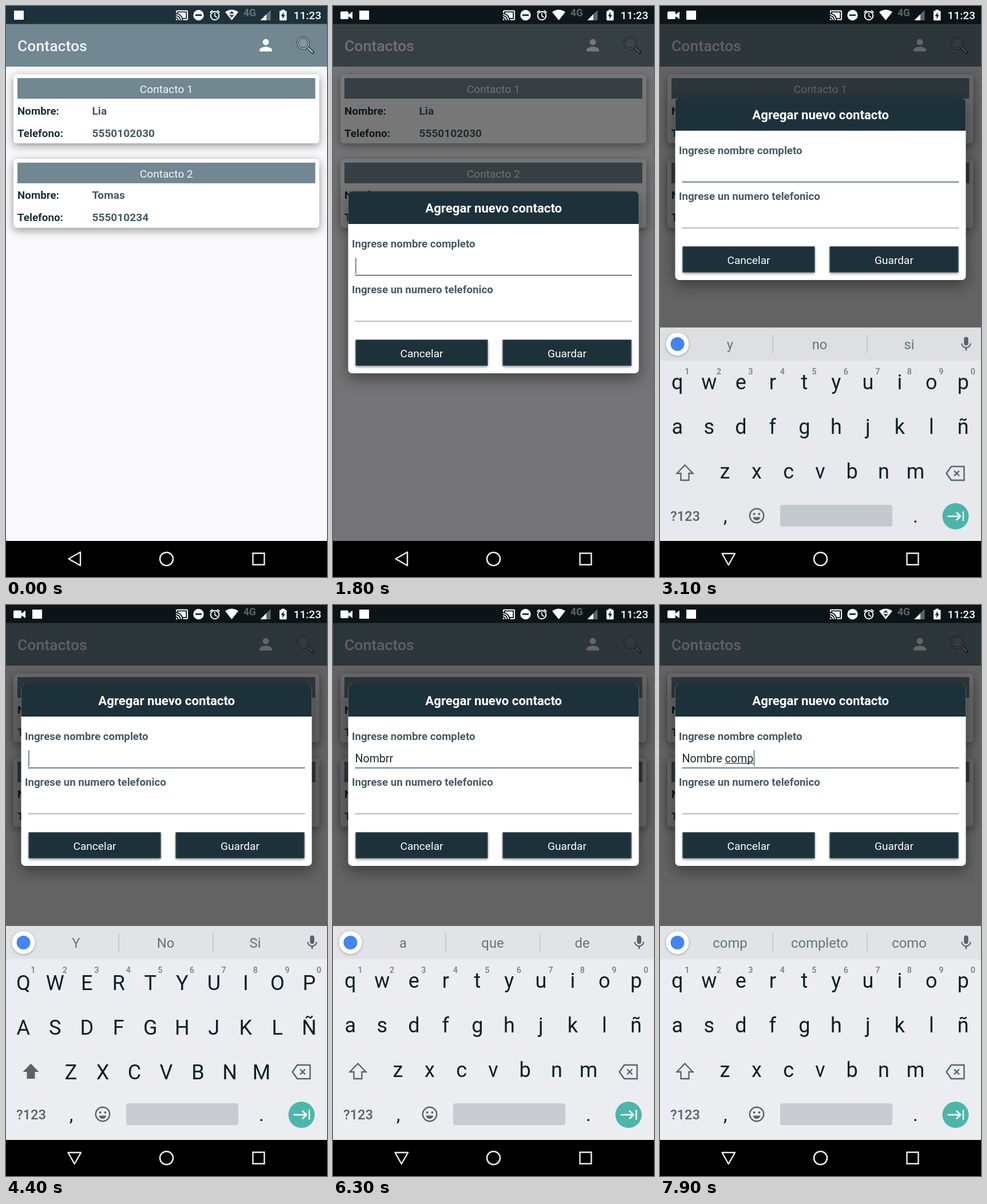
An HTML page with a canvas for the animation above (8000 ms loop, 561 px wide and 998 px high).

```html
<!DOCTYPE html>
<html lang="es">
<head>
<meta charset="utf-8">
<title>Contactos</title>
<style>
html, body { margin: 0; width: 100%; height: 100%; overflow: hidden; background: #000; }
canvas { display: block; }
</style>
</head>
<body>
<canvas id="stage" width="561" height="998"></canvas>
<script>
const W = 561, H = 998, LOOP = 8000, TAU = Math.PI * 2;
const DARK = '#1c313a', MID = '#455a64', LIGHT = '#718792', KEY = '#0b1f28', ICON = '#55636b';
const main = document.getElementById('stage').getContext('2d');
const scratch = document.createElement('canvas');
scratch.width = W;
scratch.height = H;
const buffer = scratch.getContext('2d');
let g = main;

const personIcon = new Path2D('M12 12c2.21 0 4-1.79 4-4s-1.79-4-4-4-4 1.79-4 4 1.79 4 4 4zm0 2c-2.67 0-8 1.34-8 4v2h16v-2c0-2.66-5.33-4-8-4z');
const micIcon = new Path2D('M12 14c1.66 0 3-1.34 3-3V5c0-1.66-1.34-3-3-3S9 3.34 9 5v6c0 1.66 1.34 3 3 3zm5.3-3c0 3-2.54 5.1-5.3 5.1S6.7 14 6.7 11H5c0 3.41 2.72 6.23 6 6.72V21h2v-3.28c3.28-.48 6-3.3 6-6.72h-1.7z');
const castIcon = new Path2D('M21 3H3c-1.1 0-2 .9-2 2v3h2V5h18v14h-7v2h7c1.1 0 2-.9 2-2V5c0-1.1-.9-2-2-2zM1 18v3h3c0-1.66-1.34-3-3-3zm0-4v2c2.76 0 5 2.24 5 5h2c0-3.87-3.13-7-7-7zm0-4v2c4.97 0 9 4.03 9 9h2c0-6.08-4.93-11-11-11zM19 7H5v1.63c3.96 1.28 7.09 4.41 8.37 8.37H19V7z');

// Press time and key; '<' is backspace. A key takes effect on release.
const HOLD = 100;
const strokes = [
  [4700, 'N'], [4900, 'o'], [5000, 'm'], [5200, 'b'], [5300, 'r'], [5500, 'r'], [5700, ' '],
  [6500, '<'], [6700, '<'], [6900, 'e'], [7200, ' '],
  [7400, 'c'], [7500, 'o'], [7700, 'm'], [7800, 'p']
];
const rows = [['qwertyuiop', 0, 672.5], ['asdfghjklñ', 0, 750.5], ['zxcvbnm', 1.5, 828.5]];

const clamp = v => Math.max(0, Math.min(1, v));
const easeOut = (u, n) => 1 - Math.pow(1 - clamp(u), n);
const smooth = u => (u = clamp(u), u * u * (3 - 2 * u));
const within = (t, a, b) => t >= a && t < b;
const keyX = i => 30.3 + 55.5 * i;

function text(s, x, y, size, color, weight = 400, align = 'left') {
  g.font = `${weight} ${size}px Roboto, sans-serif`;
  g.textAlign = align;
  g.fillStyle = color;
  g.fillText(s, x, y);
}

function rect(x, y, w, h, color) {
  g.fillStyle = color;
  g.fillRect(x, y, w, h);
}

function box(x, y, w, h, r, color) {
  g.beginPath();
  g.roundRect(x, y, w, h, r);
  g.fillStyle = color;
  g.fill();
}

function disc(x, y, r, color) {
  g.beginPath();
  g.arc(x, y, r, 0, TAU);
  g.fillStyle = color;
  g.fill();
}

function ring(x, y, r, color, width) {
  g.beginPath();
  g.arc(x, y, r, 0, TAU);
  g.strokeStyle = color;
  g.lineWidth = width;
  g.stroke();
}

function trace(pts, closed) {
  g.beginPath();
  for (let i = 0; i < pts.length; i += 2) g.lineTo(pts[i], pts[i + 1]);
  if (closed) g.closePath();
}

function poly(pts, color) {
  trace(pts, true);
  g.fillStyle = color;
  g.fill();
}

function line(pts, color, width, closed) {
  trace(pts, closed);
  g.strokeStyle = color;
  g.lineWidth = width;
  g.stroke();
}

function icon(path, x, y, scale, color) {
  g.save();
  g.translate(x, y);
  g.scale(scale, scale);
  g.fillStyle = color;
  g.fill(path);
  g.restore();
}

function shadowed(blur, dy, alpha, draw) {
  g.save();
  g.shadowColor = `rgba(0,0,0,${alpha})`;
  g.shadowBlur = blur;
  g.shadowOffsetY = dy;
  draw();
  g.restore();
}

// Draws a group as one translucent layer.
function layer(alpha, dy, draw) {
  buffer.clearRect(0, 0, W, H);
  g = buffer;
  draw();
  g = main;
  g.globalAlpha = alpha;
  g.drawImage(scratch, 0, dy);
  g.globalAlpha = 1;
}

function card(y, title, name, phone) {
  shadowed(15, 4, .42, () => box(13, y, 534.5, 120.5, 6, '#fff'));
  rect(20, y + 6.5, 520.5, 36, LIGHT);
  text(title, 280.3, y + 32.5, 19.1, '#f6f7f8', 400, 'center');
  text('Nombre:', 20, y + 70, 18.8, DARK, 700);
  text(name, 150.5, y + 70, 19.1, MID, 700);
  text('Telefono:', 20, y + 109, 18.8, DARK, 700);
  text(phone, 150.5, y + 109, 19.1, MID, 700);
}

function page() {
  rect(0, 0, W, 935, '#f9f8fb');
  rect(0, 0, W, 32, DARK);
  rect(0, 31.5, W, 74.5, LIGHT);
  text('Contactos', 20, 79, 26.6, '#f2f4f5', 500);
  icon(personIcon, 437.7, 52.2, 1.364, '#fff');
  g.lineCap = 'round';
  line([528, 73.5, 536, 81], '#333b40', 5.5);
  line([528.5, 74, 535.5, 80.6], '#b9c0c4', 2.6);
  disc(519.5, 65, 10, '#84969f');
  ring(519.5, 65, 9.6, '#333b40', 3.6);
  ring(519.5, 65, 9.6, '#c9cfd2', 1.4);
  card(119.5, 'Contacto 1', 'Lia', '5550102030');
  card(267.3, 'Contacto 2', 'Tomas', '555010234');
}

function statusIcons(t) {
  let x = 14;
  if (t >= 100) {
    box(13, 9.5, 14, 13.5, 2, '#fff');
    poly([27, 15, 34, 9.5, 34, 23, 27, 18], '#fff');
    x = 46;
  }
  rect(x, 8, 17, 16, '#fff');
  icon(castIcon, 296, 4.6, .96, '#fff');
  disc(336.5, 16, 9.2, '#fff');
  rect(331, 14.6, 11, 2.8, '#13242b');

  g.lineCap = 'butt';
  ring(365, 17, 7.3, '#fff', 2);
  line([365, 12, 365, 17.5, 369, 20], '#fff', 1.6);
  line([356.5, 11.5, 361, 7.8], '#fff', 2);
  line([369, 7.8, 373.5, 11.5], '#fff', 2);

  g.beginPath();
  g.moveTo(394.5, 25);
  g.lineTo(383, 10.5);
  g.quadraticCurveTo(394.5, 2.5, 406, 10.5);
  g.closePath();
  g.fillStyle = '#fff';
  g.fill();
  if (t < 100 || within(t, 1000, 1200) || within(t, 4000, 4400) || t >= 6900) {
    poly([390, 13.5, 399, 13.5, 394.5, 8.5], '#3b4b53');
    poly([390, 15.5, 399, 15.5, 394.5, 20.5], '#3b4b53');
  }

  const faint = 'rgba(255,255,255,.34)';
  text('4G', 415, 17.6, 17.5, faint, 700);
  poly([444.5, 25, 462.5, 25, 462.5, 7], faint);
  poly([444.5, 25, 455, 25, 455, 14.5], '#fff');
  box(478, 8.5, 12.5, 16.8, 1.2, '#fff');
  rect(481.5, 6.5, 5.5, 3, '#fff');
  poly([485.5, 10.5, 480.5, 17.8, 483.6, 17.8, 483, 23, 488, 15.8, 485, 15.8], '#13242b');
  text('11:23', 551, 23, 19.1, '#fff', 500, 'right');
}

function button(x, w, label) {
  shadowed(4, 2, .4, () => box(x, 583, w, 46, 2, DARK));
  g.strokeStyle = MID;
  g.lineWidth = 1.2;
  g.strokeRect(x + .6, 583.6, w - 1.2, 44.8);
  text(label, x + w / 2, 613.5, 19.1, '#fff', 400, 'center');
}

function dialog(typed, word, cursor) {
  shadowed(26, 9, .42, () => box(26.5, 324, 508, 318, 7, '#fff'));
  box(26.5, 324, 508, 57, [7, 7, 0, 0], DARK);
  text('Agregar nuevo contacto', 280.7, 361, 22.2, '#fff', 700, 'center');
  text('Ingrese nombre completo', 33, 421.6, 18.7, MID, 700);
  text('Ingrese un numero telefonico', 33, 502.2, 18.7, MID, 700);
  rect(38.5, 469.6, 484, 2.2, LIGHT);
  rect(38.5, 550.4, 484, 1.1, '#858789');
  button(39.5, 231, 'Cancelar');
  button(296.5, 225, 'Guardar');

  text(typed, 38.5, 460.5, 19.6, '#1b2a31');
  const end = 38.5 + g.measureText(typed).width;
  if (word) {
    const w = g.measureText(word).width;
    rect(end - w, 462, w, 1.2, '#1b2a31');
  }
  if (cursor) rect(end + .3, 440, 2, 28, LIGHT);
}

function suggestions(typed, word, caps) {
  if (!typed) return caps ? ['Y', 'No', 'Si'] : ['y', 'no', 'si'];
  if (!word) return ['a', 'que', 'de'];
  return word[0] === 'N' ? [word, 'Nombre', 'Nombres'] : [word, 'completo', 'como'];
}

function popup(key) {
  for (const [letters, shift, base] of rows) {
    const i = letters.indexOf(key.toLowerCase());
    if (i < 0) continue;
    const x = keyX(i + shift);
    shadowed(5, 1, .25, () => box(x - 29, base - 98, 58, 121, 6, '#fafbfc'));
    text(key, x, base - 54, 40, KEY, 400, 'center');
  }
}

function keyboard(typed, word, caps, pressed) {
  rect(0, 561, W, 374, '#ebedf0');
  rect(0, 561, W, 58, '#e1e3e6');
  rect(196.5, 574, 1.2, 32, '#b4b9be');
  rect(361.5, 574, 1.2, 32, '#b4b9be');
  shadowed(4, 1, .3, () => disc(30.5, 590, 20, '#fff'));
  disc(30.5, 590, 12, '#4285f4');
  suggestions(typed, word, caps).forEach((s, i) =>
    text(s, 122.5 + 156.5 * i, 599.3, 23.8, '#65747c', 400, 'center'));
  icon(micIcon, 520, 575, 1.25, ICON);

  rows.forEach(([letters, shift, base], row) => {
    [...letters].forEach((c, i) => {
      text(caps ? c.toUpperCase() : c, keyX(i + shift), caps ? base : base - 4, 36, KEY, 400, 'center');
      if (!row) text((i + 1) % 10, keyX(i) + 17, 643, 14.5, '#727e85', 500, 'center');
    });
  });

  g.lineJoin = 'miter';
  g.lineCap = 'butt';
  const arrow = [43.5, 801.5, 57.5, 816, 50.5, 816, 50.5, 828, 36.5, 828, 36.5, 816, 29.5, 816];
  if (caps) poly(arrow, ICON);
  else line(arrow, ICON, 2.3, true);

  if (pressed === '<') box(478, 779, 76, 73, 6, '#d3d7da');
  g.lineJoin = 'round';
  line([500.5, 816, 509, 804, 531.5, 804, 531.5, 828, 509, 828], ICON, 2.4, true);
  line([514, 811.5, 523, 820.5], ICON, 2.4);
  line([523, 811.5, 514, 820.5], ICON, 2.4);

  text('?123', 44, 899.2, 23.8, ICON, 500, 'center');
  text(',', 114, 902, 34, KEY, 400, 'center');
  text('.', 446.5, 902, 34, KEY, 400, 'center');
  ring(169, 890, 12.2, ICON, 2.4);
  disc(164.6, 887, 1.9, ICON);
  disc(173.4, 887, 1.9, ICON);
  g.beginPath();
  g.arc(169, 891.5, 6.4, .15, Math.PI - .15);
  g.fillStyle = ICON;
  g.fill();
  box(210, 871, 196, 38, 4, pressed === ' ' ? '#b1b5b9' : '#c8cbcf');
  disc(516.5, 891, 23, '#4db6ac');
  line([502.5, 891, 525, 891], '#fff', 2.5);
  line([518, 884, 525, 891, 518, 898], '#fff', 2.5);
  line([530, 882.5, 530, 899.5], '#fff', 2.5);
  if (pressed) popup(pressed);
}

function navBar(down) {
  const c = '#eeeeee';
  rect(0, 935, W, 63, '#000');
  g.lineJoin = 'round';
  line(down ? [108.5, 957, 131, 957, 119.7, 977] : [109.5, 966.3, 130, 954.5, 130, 978], c, 2.4, true);
  ring(280.5, 966.5, 11.5, c, 2.5);
  g.lineJoin = 'miter';
  line([431.5, 956.5, 451.5, 956.5, 451.5, 976.5, 431.5, 976.5], c, 2.4, true);
}

function render(t) {
  let typed = '', pressed = '', blink = t < 3400 ? 1900 : 3400;
  for (const [at, key] of strokes) {
    if (within(t, at, at + HOLD)) pressed = key;
    if (t < at + HOLD) continue;
    typed = key === '<' ? typed.slice(0, -1) : typed + key;
    blink = at + HOLD;
  }
  const word = typed.split(' ').pop();
  const caps = t >= 3300 && !typed;
  const cursor = t < 2400 || (t >= 3400 && Math.floor((t - blink) / 500) % 2 === 0);

  page();
  rect(0, 0, W, 935, `rgba(0,0,0,${.6 * smooth((t - 1420) / 480)})`);
  if (t >= 1500) {
    const lift = 186 * easeOut((t - 2900) / 398, 3);
    layer(easeOut((t - 1460) / 220, 2), -lift, () => dialog(typed, word, cursor));
  }
  statusIcons(t);
  if (t > 2900) {
    const show = easeOut((t - 2900) / 240, 2);
    layer(show, (1 - show) * 30, () => keyboard(typed, word, caps, pressed));
  }
  navBar(t >= 2900);
}

const start = performance.now();
function tick() {
  const t = (performance.now() - start) % LOOP;
  render(Math.floor(t / 100) * 100);
  requestAnimationFrame(tick);
}
tick();
</script>
</body>
</html>
```
